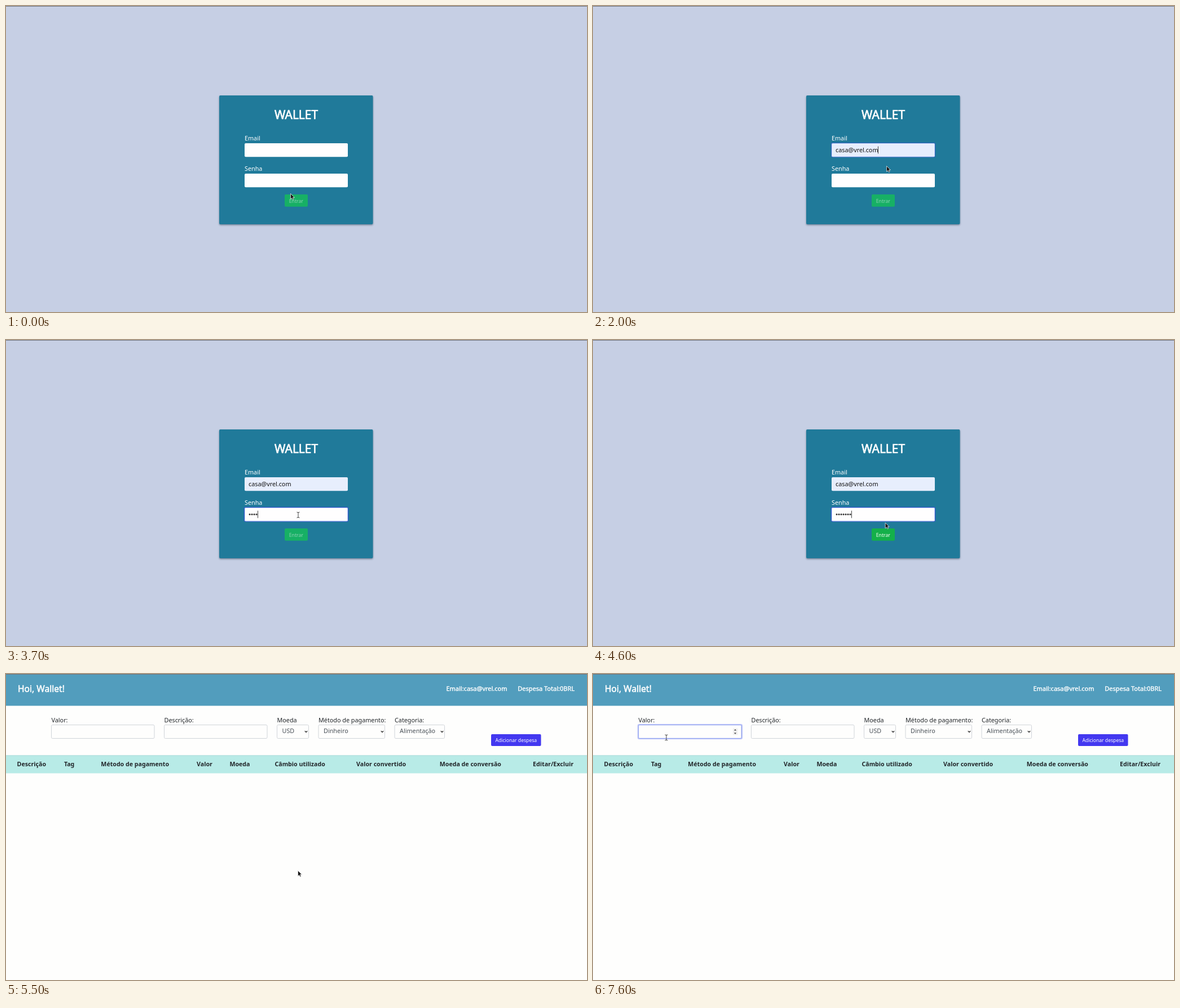
An HTML page with a canvas that plays this animation: 1030 px wide and 544 px high, repeating every 8000 ms.

```html
<!DOCTYPE html>
<html lang="pt">
<head>
<meta charset="utf-8">
<title>Wallet</title>
<style>
html, body { margin: 0; width: 100%; height: 100%; overflow: hidden; background: #c6cfe4; }
canvas { display: block; width: 1030px; height: 544px; }
</style>
</head>
<body>
<canvas id="stage" width="1030" height="544"></canvas>
<script>
const g = document.getElementById('stage').getContext('2d');
const LOOP = 8000, STEP = 100, SIZE = 10.8, EMAIL = 'casa@vrel.com';
const FONT = '"Noto Sans", "Open Sans", sans-serif';
const INK = '#212529', LINE = '#d0d4d9', PAPER = '#fffefe';

// Moments of the story
const FOCUS_EMAIL = 1500, FILL = 2000, FOCUS_PASSWORD = 2900, TYPE = 3100, SUBMIT = 5300, ENTER = 5500, FOCUS_VALUE = 6900;

// Pointer moves: start time, end time, x, y of the destination
const MOVES = [
  [0, 0, 504, 333], [100, 200, 607, 378], [300, 400, 636, 379], [500, 900, 598, 282], [1000, 1400, 524, 258],
  [1700, 1900, 520, 284], [2300, 2700, 518, 311], [4200, 5200, 517, 349], [5700, 6100, 264, 146], [6300, 7300, 130, 113]
];

const clamp = (v, max) => Math.max(0, Math.min(max, v));
const smooth = u => u * u * (3 - 2 * u);

function pointerAt(t) {
  let x = 0, y = 0;
  for (const [from, to, toX, toY] of MOVES) {
    const k = to > from ? smooth(clamp((t - from) / (to - from), 1)) : 1;
    x += (toX - x) * k;
    y += (toY - y) * k;
  }
  return [x, y];
}

function rect(x, y, w, h, fill, r = 0) {
  g.beginPath();
  g.roundRect(x, y, w, h, r);
  g.fillStyle = fill;
  g.fill();
}

function shadowed(blur, dy, color, draw) {
  g.save();
  g.shadowBlur = blur;
  g.shadowOffsetY = dy;
  g.shadowColor = color;
  draw();
  g.restore();
}

function outline(x, y, w, h, color, width = 1) {
  g.beginPath();
  g.roundRect(x, y, w, h, 2);
  g.strokeStyle = color;
  g.lineWidth = width;
  g.stroke();
}

function text(s, x, y, { size = SIZE, color = INK, weight = 'normal', align = 'left' } = {}) {
  g.font = `${weight === 'bold' ? 700 : 400} ${size}px ${FONT}`;
  g.textAlign = align;
  g.fillStyle = g.strokeStyle = color;
  g.fillText(s, x, y);
  // A thin stroke thickens regular letters to a medium weight.
  if (weight === 'medium') {
    g.lineWidth = size * .035;
    g.strokeText(s, x, y);
  }
}

function poly(points, fill, stroke, width = 1) {
  g.beginPath();
  points.forEach(([x, y]) => g.lineTo(x, y));
  if (fill) { g.closePath(); g.fillStyle = fill; g.fill(); }
  if (stroke) { g.strokeStyle = stroke; g.lineWidth = width; g.stroke(); }
}

function arrow(x, y) {
  const shape = [[0, 0], [0, 10], [2.3, 8], [4, 11], [5.6, 10.2], [4, 7], [7, 7]];
  poly(shape.map(([a, b]) => [x + a + .5, y + b + .5]), '#161616', '#e8e8e8', .8);
}

function beam(x, y) {
  for (const s of [-1, 1])
    poly([[x - 2.5, y + s * 5], [x, y + s * 4.3], [x + 2.5, y + s * 5]], null, '#444');
  rect(x - .5, y - 4.5, 1, 9, '#444');
}

const caret = (x, y) => rect(x, y - 6.5, 1, 13, '#444');

function field(label, y, fill, focus) {
  text(label, 423, y - 4.7, { color: '#fff' });
  if (focus) outline(422.5, y - .5, 184, 25, `rgba(58, 70, 225, ${.6 * focus})`, 1.5);
  rect(423, y, 183, 24.2, fill, 2);
  if (focus) outline(423.5, y + .5, 182, 23.2, `rgba(120, 145, 240, ${.4 * focus})`);
}

function login(t) {
  rect(0, 0, 1030, 544, '#c6cfe4');
  shadowed(3, 1.5, 'rgba(20, 45, 70, .5)', () => rect(378, 159, 272.5, 229, '#207a9a', 2));
  text('WALLET', 514.5, 201, { size: 20.9, color: '#fff', weight: 'medium', align: 'center' });

  const filled = t >= FILL;
  const inEmail = t >= FOCUS_EMAIL && t < FOCUS_PASSWORD;
  const inPassword = t >= FOCUS_PASSWORD && t < SUBMIT;
  field('Email', 244, filled ? '#e7eefd' : PAPER, inEmail && t > FOCUS_EMAIL ? .65 : 0);
  field('Senha', 298, PAPER, inPassword ? 1 : t >= SUBMIT ? .3 : 0);
  if (filled) text(EMAIL, 430, 260, { color: '#111' });
  if (inEmail) caret(filled ? 505 : 430, 256);

  const dots = clamp(Math.floor((t - TYPE) / 200) + 1, 7);
  for (let i = 0; i < dots; i++) rect(430.5 + i * 4, 308.5, 3.1, 3.1, '#333', 1.55);
  if (inPassword) caret(430 + dots * 4, 310);

  const enabled = dots > 5, hover = t >= 4900;
  rect(494, 335, 41, 21.7, hover ? '#10a339' : enabled ? '#14b04a' : '#17b065', 2);
  text('Entrar', 514.3, 349.5, { size: 8.7, color: enabled ? '#f4fff6' : '#8bd2b4', align: 'center' });

  if (t >= FOCUS_EMAIL && !filled) {
    shadowed(3, 1, 'rgba(0, 0, 0, .4)', () => rect(478, 273.5, 87, 24.5, PAPER, 2));
    poly([[484, 274], [489.5, 268.5], [495, 274]], PAPER);
    if (t >= 1800) rect(478, 277, 87, 17, '#e8e8ea');
    text(EMAIL, 485, 289.3, { size: 8.4 });
  }
}

// Labelled inputs and selects, set side by side with an even gap
function form() {
  const items = [
    ['Valor:', 183.5], ['Descrição:', 183.5], ['Moeda', 57, 'USD'],
    ['Método de pagamento:', 118.5, 'Dinheiro'], ['Categoria:', 89.5, 'Alimentação']
  ];
  let x = 80;
  for (const [label, w, value] of items) {
    text(label, x + .5, 85.5);
    outline(x + .5, 90.5, w - 1, 24, LINE);
    if (value) {
      const end = x + w - 5;
      text(value, x + 9.5, 105.3, { color: '#495057' });
      poly([[end - 2.2, 101.2], [end, 103.5], [end + 2.2, 101.2]], null, '#333', 1.3);
    }
    x += w + 16.5;
  }
  rect(860, 107, 88.5, 21, '#4338f0', 2);
  text('Adicionar despesa', 904.3, 121, { size: 8.6, color: '#fff', align: 'center' });
}

// Columns share the row in proportion to their padded titles.
function tableHead() {
  const titles = ['Descrição', 'Tag', 'Método de pagamento', 'Valor', 'Moeda', 'Câmbio utilizado',
    'Valor convertido', 'Moeda de conversão', 'Editar/Excluir'];
  const size = 10.65;
  rect(0, 144.5, 1030, 32, '#b8ebe7');
  rect(0, 144.5, 1030, 1, '#b2dedb');
  g.font = `700 ${size}px ${FONT}`;
  const widths = titles.map(s => g.measureText(s).width + 11.5);
  const scale = 1030 / widths.reduce((a, b) => a + b);
  let x = 0;
  titles.forEach((s, i) => {
    const w = widths[i] * scale;
    text(s, x + w / 2, 164.4, { size, weight: 'bold', align: 'center' });
    x += w;
  });
}

function wallet(t) {
  const white = { color: '#fff', weight: 'medium' };
  rect(0, 0, 1030, 544, '#fefefd');
  rect(0, 0, 1030, 56.5, '#529dbd');
  text('Hoi, Wallet!', 21, 31.8, { ...white, size: 15.6 });
  text('Email:' + EMAIL, 888.5, 30.2, { ...white, size: 11, align: 'right' });
  text('Despesa Total:0BRL', 1008, 30.2, { ...white, size: 11, align: 'right' });
  form();
  tableHead();

  if (t >= FOCUS_VALUE) {
    outline(80, 90, 184, 25, '#c5cbfa', 2.5);
    outline(80.5, 90.5, 183, 24, '#8ea2ee');
    if (t < 7500) caret(88, 102.5);
    rect(248, 96.5, 8.5, 12, '#f0f0f0');
    for (const s of [-1, 1])
      poly([[250, 102.5 + s * 2], [254.2, 102.5 + s * 2], [252.1, 102.5 + s * 4.6]], '#444');
  }
}

function frame(now) {
  const t = Math.floor(now % LOOP / STEP) * STEP;
  const [x, y] = pointerAt(t);
  const over = (left, top) => x > left && x < left + 183 && y > top && y < top + 24;
  const loggedIn = t >= ENTER;
  (loggedIn ? wallet : login)(t);
  rect(0, 0, 1030, 1, '#70757f');
  const overText = loggedIn ? over(80, 90) : over(423, 244) || over(423, 298);
  (overText ? beam : arrow)(x, y);
  requestAnimationFrame(frame);
}
requestAnimationFrame(frame);
</script>
</body>
</html>
```
